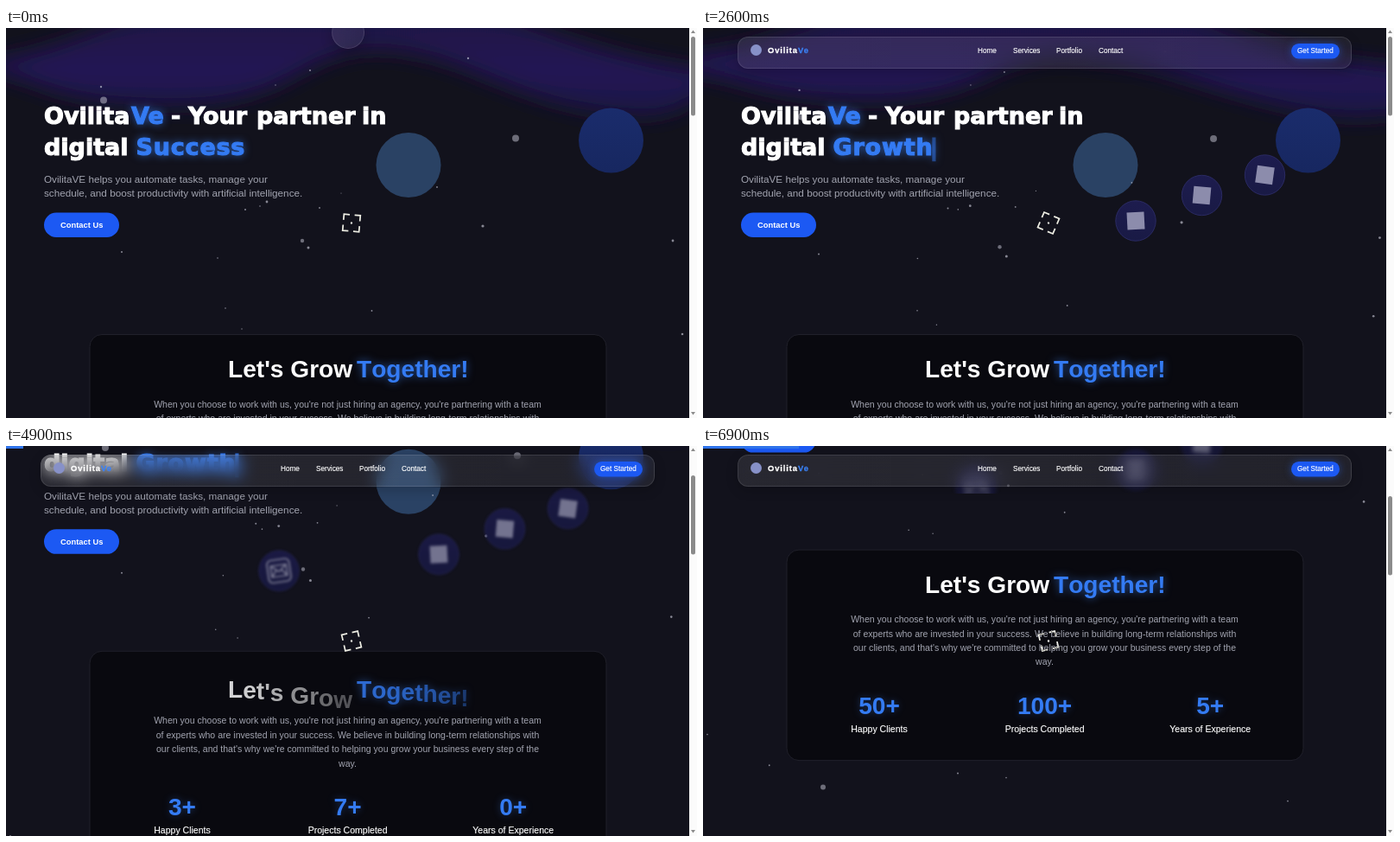
Animation, 800 px wide and 451 px high, one loop 7000 ms. Source, as an HTML page:

```html
<!DOCTYPE html>
<html lang="en">
<head>
<meta charset="utf-8">
<title>OvilitaVe</title>
<style>
  html, body { margin: 0; width: 100%; height: 100%; overflow: hidden; background: #12121c; }
  #stage { position: relative; width: 800px; height: 451px; overflow: hidden; background: #12121c; isolation: isolate; font-family: "Liberation Sans", Arial, sans-serif; }
  #stage > *, #page > * { position: absolute; left: 0; top: 0; }
  svg { display: block; }
  .title { font: bold 27px "DejaVu Sans", sans-serif; fill: #fff; stroke: #fff; stroke-width: 1.1px; }
  .blue { fill: #347bf3; stroke: #347bf3; filter: drop-shadow(0 0 5px #3b82f699); }
  .lead { font-size: 11.71px; fill: #a2a4b0; }
  .body { font-size: 10.54px; fill: #a2a4b0; text-anchor: middle; }
  .stat { font-size: 28.1px; font-weight: bold; fill: #347bf3; text-anchor: middle; filter: drop-shadow(0 0 4px #3b82f655); }
  .label { font-size: 10.54px; fill: #fff; stroke: #fff; stroke-width: .15px; text-anchor: middle; }
  .link { font-size: 8.2px; fill: #fff; stroke: #fff; stroke-width: .15px; }
  #page > h2 { margin: 0; top: 381px; font-size: 28.1px; line-height: 28px; color: #fff; white-space: pre; }
  #page > h2.blue { color: #347bf3; }
  h2 span { display: inline-block; }
  #nav { box-sizing: border-box; height: 37.5px; background: linear-gradient(90deg, #ffffff18, #ffffff12); border: 1px solid #ffffff1c; backdrop-filter: blur(9px); box-shadow: 0 4px 14px #0003; }
  #bar { height: 2.5px; background: #2f74ea; }
  #cursor { mix-blend-mode: difference; }
</style>
</head>
<body>
<div id="stage">
  <div id="page">
    <svg width="800" height="720">
      <defs>
        <linearGradient id="wave" x2="0" y2="1">
          <stop offset="0" stop-color="#1d143f"/><stop offset=".6" stop-color="#231655"/><stop offset="1" stop-color="#1b1345"/>
        </linearGradient>
        <linearGradient id="deep" x2="0" y2="1">
          <stop offset="0" stop-color="#1a2c6c"/><stop offset="1" stop-color="#172760"/>
        </linearGradient>
        <linearGradient id="disc" x2="0" y2="1">
          <stop offset="0" stop-color="#1d1c4e"/><stop offset="1" stop-color="#191a45"/>
        </linearGradient>
        <clipPath id="hero"><rect width="791" height="289"/></clipPath>
        <filter id="soft" x="-10%" y="-50%" width="120%" height="200%"><feGaussianBlur stdDeviation="12"/></filter>
      </defs>
      <path id="aurora" fill="url(#wave)" filter="url(#soft)"/>
      <circle cx="466" cy="158.500" r="37.500" fill="#2a4264"/>
      <circle cx="700.500" cy="130" r="37.500" fill="url(#deep)"/>
      <g id="dust" fill="#c8c8d6"></g>
      <g clip-path="url(#hero)"><g id="icons"></g></g>
      <g class="title">
        <text y="111"><tspan x="44">Ovilita</tspan><tspan x="191">-</tspan><tspan x="211">Your</tspan><tspan x="290">partner</tspan><tspan x="412">in</tspan></text>
        <text x="145" y="111" class="blue">Ve</text>
        <text x="44" y="146.500">digital</text>
        <text x="150.500" y="146.500" class="blue" letter-spacing=".8"><tspan id="word"></tspan><tspan id="caret" dx="-4">|</tspan></text>
      </g>
      <g class="lead">
        <text x="44" y="179">OvilitaVE helps you automate tasks, manage your</text>
        <text x="44" y="195.400">schedule, and boost productivity with artificial intelligence.</text>
      </g>
      <rect x="44" y="213.500" width="87" height="28.500" rx="14.250" fill="#1c59f3"/>
      <text x="63" y="231" font-size="9.370" font-weight="bold" fill="#fff">Contact Us</text>
      <rect x="97" y="354.500" width="598" height="243.500" rx="14" fill="#09090f" stroke="#20202a"/>
      <g class="body" id="copy"></g>
      <g id="stats"></g>
    </svg>
    <h2 style="left:257px">Let's Grow</h2>
    <h2 style="left:406px" class="blue">Together!</h2>
  </div>
  <div id="nav"></div>
  <svg id="menu" width="800" height="60">
    <circle cx="61.500" cy="25.500" r="6.500" fill="#8791c8"/>
    <g font-size="9.370" font-weight="bold" letter-spacing=".9" stroke-width=".3">
      <text x="75" y="29" fill="#fff" stroke="#fff">Ovilita</text>
      <text x="110" y="29" fill="#3b82f6" stroke="#3b82f6">Ve</text>
    </g>
    <rect x="681" y="18" width="56" height="17.500" rx="8.750" fill="#1c59f3" style="filter:drop-shadow(0 0 4px #2563eb80)"/>
    <text class="link" y="29"><tspan x="318">Home</tspan><tspan x="359">Services</tspan><tspan x="409">Portfolio</tspan><tspan x="458">Contact</tspan><tspan x="688">Get Started</tspan></text>
  </svg>
  <div id="bar"></div>
  <svg width="800" height="451">
    <rect x="791" width="9" height="451" fill="#fbfbfb"/>
    <path d="M793 6l2.500-3.500 2.500 3.500zM793 444l2.500 3.500 2.500-3.500z" fill="#8b8b8b"/>
    <rect id="thumb" x="793" width="5" height="91.500" rx="2.500" fill="#8b8b8b"/>
  </svg>
  <svg id="cursor" width="800" height="451"><g id="reticle" fill="none" stroke="#fff" stroke-width="1.750"></g></svg>
</div>
<script>
const LOOP = 7000, STEP = 100, NOTCH = 58.6;
const $ = id => document.getElementById(id);
const clamp = u => Math.max(0, Math.min(1, u));
const ramp = (t, start, length) => clamp((t - start) / length);
const smooth = u => u * u * (3 - 2 * u);
const easeOut = u => 1 - (1 - u) ** 4;

function add(parent, tag, attrs, text = "") {
  const node = document.createElementNS("http://www.w3.org/2000/svg", tag);
  for (const key in attrs) node.setAttribute(key, attrs[key]);
  node.textContent = text;
  parent.append(node);
  return node;
}

// x, y, speed x, speed y (px per second), radius
const dust = [
  [113, 83.5, .4, 7.3, 4], [590, 127.5, .4, .2, 4], [110, 68, .6, 1.5, 1.2], [535, 35, 0, -3, 1.2],
  [352, 49, -1.2, .8, 1], [312, 66, -.8, 0, .7], [499, 184, -1, -2, .9], [552, 229, .8, -1.6, 1.6],
  [772, 246, 4.4, -1.3, 1.4], [783, 354, -2.6, -8, 1.3], [343, 246, .2, 2.8, 2.2], [350, 254, .5, 3.8, 1.5],
  [302, 201, 2.8, 1.8, 1.4], [277, 210, 2.5, -.6, 1], [294, 206, .5, 1.5, .8], [363, 208, -.5, -.4, .9],
  [134, 259, 0, 1, 1], [245, 266, 1.3, .2, .8], [423.5, 327, -.7, -2.3, .9], [254, 324, -2.3, 1.1, .8],
  [273, 348, -1, -1.8, .7], [388, 191, -1, -1, .6], [139, 629, 0, 0, 3], [54, 585, 3.3, 2.7, .9],
  [295, 604, 0, 1.3, 1], [677, 645, 0, 0, .9], [351, 618, 0, 0, .8], [5, 568, 0, 0, .8]
].map(([x, y, vx, vy, r]) => ({ x, y, vx, vy, node: add($("dust"), "circle", { r, opacity: r > 2 ? .5 : .65 }) }));

const icons = [[650.5, 170, 8], [577.5, 193.5, 5], [501, 223, -3], [316, 242, -8]].map(([x, y, tilt], i) => {
  const node = add($("icons"), "g");
  add(node, "circle", { r: 23.2, fill: "url(#disc)", stroke: "#2a2a62" });
  const sign = add(node, "g", { transform: `rotate(${tilt})`, fill: "none", stroke: "#a3a3bd", "stroke-width": 1.6 });
  if (i < 3) add(sign, "rect", { x: -10, y: -10, width: 20, height: 20, fill: "#8c8cac", stroke: "none" });
  else {
    add(sign, "rect", { x: -13, y: -13, width: 26, height: 26, rx: 5 });
    add(sign, "path", { d: "M-9-6.500H9V6.500H-9ZL0 1 9-6.500M-9 6.500L-3-1M9 6.500L3-1" });
  }
  return { x, y, node, start: 1170 + 490 * i };
});

[
  "When you choose to work with us, you're not just hiring an agency, you're partnering with a team",
  "of experts who are invested in your success. We believe in building long-term relationships with",
  "our clients, and that's why we're committed to helping you grow your business every step of the",
  "way."
].forEach((line, i) => add($("copy"), "text", { x: 395.5, y: 438.6 + 16.4 * i }, line));

const stats = [[50, "Happy Clients"], [100, "Projects Completed"], [5, "Years of Experience"]].map(([goal, label], i) => {
  const x = 204 + 191.6 * i;
  add($("stats"), "text", { x, y: 565.2, class: "label" }, label);
  return { goal, node: add($("stats"), "text", { x, y: 544, class: "stat" }) };
});

const headings = [...document.querySelectorAll("h2")].map(h => {
  const letters = [...h.textContent].map(c => Object.assign(document.createElement("span"), { textContent: c }));
  h.replaceChildren(...letters);
  return letters;
});

for (let a = 0; a < 360; a += 90)
  add($("reticle"), "path", { d: "M-9.500-2.800V-9.500H-2.800", transform: `rotate(${a})` });
add($("reticle"), "circle", { r: 1.2, fill: "#fff", stroke: "none" });

const wheel = [4600, 4700, 5240, 5850];
const total = f => wheel.reduce((sum, start) => sum + f(start), 0);

function typed(t) {
  if (t < 1900) return "Success".slice(0, 7 - Math.floor(7 * ramp(t, 1300, 420)));
  return "Growth".slice(0, Math.floor(6 * ramp(t, 1900, 450)));
}

function drawNav(t) {
  const open = smooth(ramp(t, 300, 650)), width = 38 + 673.5 * open;
  Object.assign($("nav").style, {
    left: 395.7 - width / 2 + "px",
    top: -14 + 23.5 * easeOut(ramp(t, 0, 400)) + "px",
    width: width + "px",
    borderRadius: 19 - 7 * open + "px"
  });
  $("menu").style.opacity = ramp(t, 850, 380);
}

function drawAurora(t) {
  const k = smooth(ramp(t, 0, 1200)), s = t / 1000;
  $("aurora").setAttribute("d", `M-40 ${40 - 10 * k}V${50 + s}C20 50 40 ${78 - 8 * k} 120 ${86 - 6 * k}S270 ${92 - 8 * k} 330 ${58 - s}
    S420 ${20 + 12 * k} 480 ${32 + 8 * k}S600 ${84 - 8 * k} 680 ${96 - s}S770 ${104 - 2 * k} 830 ${62 + 36 * k}
    V${50 - 4 * k}C720 40 640 ${10 + 10 * k} 540 -30H200C120 -10 60 30 -40 ${40 - 10 * k}Z`);
}

function draw(t) {
  const scroll = NOTCH * total(start => smooth(ramp(t, start, 200)));
  $("page").style.transform = `translateY(${-scroll}px)`;
  $("thumb").setAttribute("y", 10 + .205 * scroll);
  $("bar").style.width = 28 * total(start => 1 - Math.exp(-Math.max(0, t - start - 150) / 220)) + "px";

  drawAurora(t);
  drawNav(t);

  for (const { x, y, vx, vy, node } of dust) {
    node.setAttribute("cx", x + vx * t / 1000);
    node.setAttribute("cy", y + vy * t / 1000);
  }

  for (const { x, y, node, start } of icons)
    node.setAttribute("transform", `translate(${x} ${y}) scale(${smooth(ramp(t, start, 420))})`);
  $("icons").setAttribute("transform", `translate(0 ${.166 * scroll})`);
  $("icons").style.filter = scroll ? `blur(${scroll * .012}px)` : "none";
  $("icons").style.opacity = 1 - scroll / 600;

  $("word").textContent = typed(t);
  $("caret").style.opacity = t < 1300 ? 0 : .5 + .5 * Math.cos(2 * Math.PI * (t - 4000) / 800);

  for (const letters of headings) letters.forEach((span, i) => {
    const p = t < 4650 ? 1 : easeOut(ramp(t, 4650 + 21 * i, 700));
    span.style.opacity = p;
    span.style.transform = `translateY(${23.4 * (1 - p)}px)`;
  });

  for (const { goal, node } of stats)
    node.textContent = Math.floor(goal * ramp(t, 4825, 1000)) + "+";

  $("reticle").setAttribute("transform", `translate(400 225.500) rotate(${5 + t * .18})`);
}

function tick() {
  draw(Math.floor(performance.now() % LOOP / STEP) * STEP);
  requestAnimationFrame(tick);
}
tick();
</script>
</body>
</html>
```
